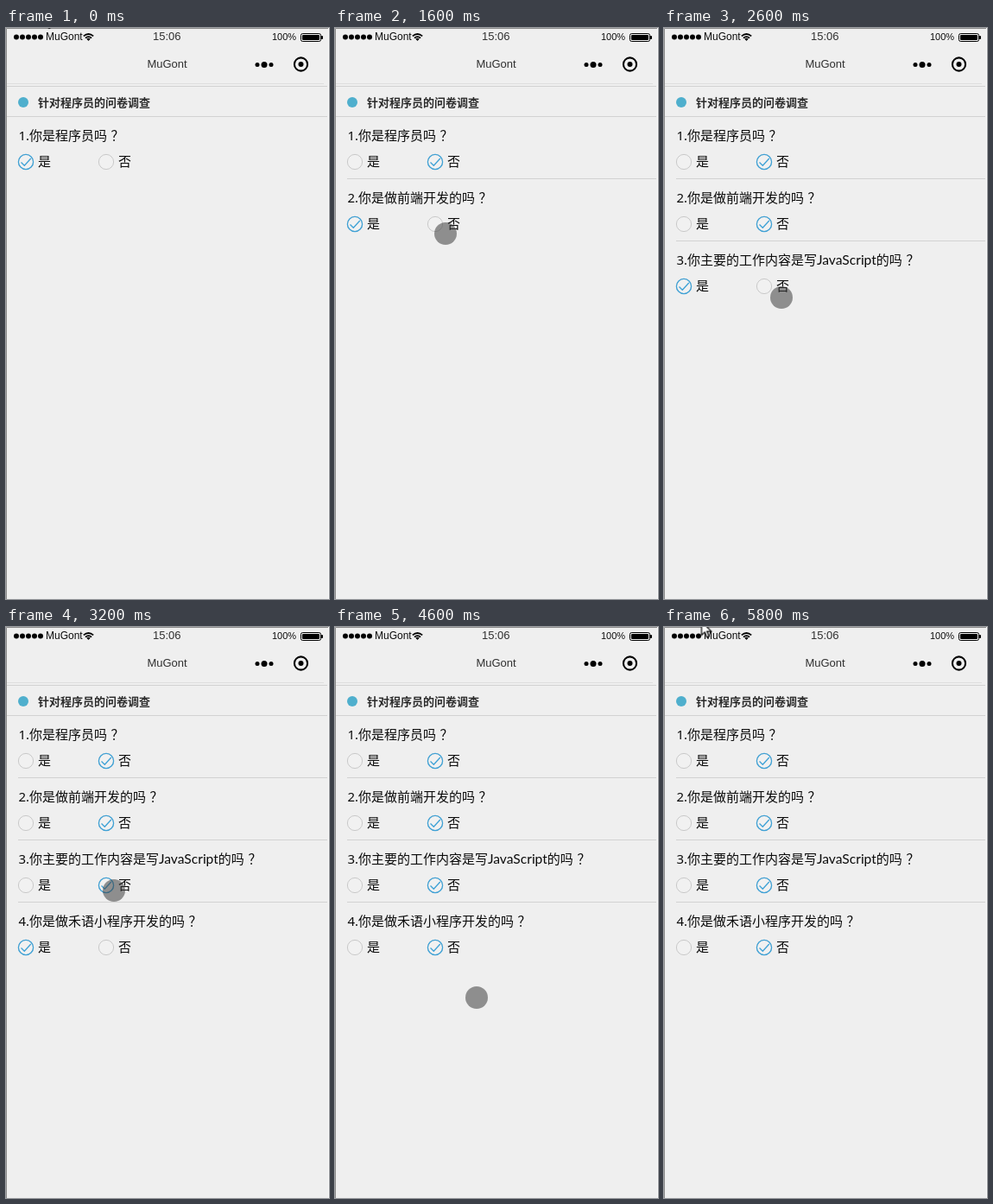
Recreate the animation shown at these times as an HTML page. Size 374 by 661 pixels, loop 6 s.

```html
<!DOCTYPE html>
<html lang="zh-CN">
<head>
<meta charset="utf-8">
<title>问卷调查</title>
<style>
  @property --n { syntax: "<number>"; inherits: true; initial-value: 0; }

  html, body { margin: 0; width: 100%; height: 100%; overflow: hidden; background: #efefef; }

  svg {
    display: block; width: 374px; height: 661px;
    animation: answers 6s step-end infinite;
  }

  text { fill: #0c0c0c; white-space: pre; }
  .ui { font-family: "Liberation Sans", Arial, sans-serif; }
  .soft { fill: #303030; font-size: 13px; }
  .cn { font: 15px "Noto Sans", "Noto Sans CJK SC", sans-serif; }
  .latin { font-family: Lato, sans-serif; font-size: 15.6px; }
  .head { font-size: 13px; font-weight: 700; fill: #2b2b2b; }
  .rule { stroke: #d2d2d2; }
  .ring { fill: #f1f1f1; stroke: #c9c9c9; }
  .tick { fill: none; stroke: #3da1d6; stroke-width: 1.3; }

  /* --n counts the answered questions, --i is the row */
  .row { opacity: clamp(0, var(--n) - var(--i) + 1, 1); }
  .tick { transform: translateX(calc(93px * clamp(0, var(--n) - var(--i), 1))); }

  .touch { fill: rgba(56, 56, 56, .53); animation: touch 6s step-end infinite; }
  .arrow { fill: #fff; stroke: #000; stroke-width: 1.2; animation: arrow 6s step-end infinite; }

  @keyframes answers {
    0% { --n: 0; }
    23.333% { --n: 1; }
    33.333% { --n: 2; }
    53.333% { --n: 3; }
    70%, to { --n: 4; }
  }

  @keyframes touch {
    0% { transform: translate(-50px, 0); }
    6.666% { transform: translate(53px, 90px); }
    10% { transform: translate(98px, 160px); }
    13.333% { transform: translate(115px, 180px); }
    16.666% { transform: translate(132px, 188px); }
    20% { transform: translate(122px, 163px); }
    23.333% { transform: translate(122px, 172px); }
    26.666% { transform: translate(128px, 238px); }
    30% { transform: translate(125px, 234px); }
    33.333% { transform: translate(124px, 235px); }
    36.666% { transform: translate(126px, 242px); }
    43.333% { transform: translate(136px, 312px); }
    46.666% { transform: translate(130px, 307px); }
    50% { transform: translate(126px, 304px); }
    53.333% { transform: translate(125px, 305px); }
    56.666% { transform: translate(126px, 345px); }
    60% { transform: translate(130px, 405px); }
    63.333% { transform: translate(143px, 391px); }
    76.666% { transform: translate(164px, 429px); }
    83.333% { transform: translate(122px, 208px); }
    86.666% { transform: translate(66px, 126px); }
    90% { transform: translate(27px, 78px); }
    93.333%, to { transform: translate(-50px, 0); }
  }

  @keyframes arrow {
    0% { transform: translate(43.5px, -18px); }
    3.333% { transform: translate(44.5px, 24.5px); }
    6.666% { transform: translate(-50px, 0); }
    93.333% { transform: translate(36.5px, 30.5px); }
    96.666%, to { transform: translate(43.5px, -6.5px); }
  }
</style>
</head>
<body>
<svg viewBox="0 0 374 661">
  <rect width="374" height="661" fill="#efefef"/>
  <path d="M373.5 0V661" stroke="#fafafa"/>
  <path d="M.5 661V.5H373" fill="none" stroke="#8c8c8c"/>

  <g class="ui">
    <path d="M12 10.5h28.1" stroke="#000" stroke-width="6" stroke-linecap="round" stroke-dasharray="0 7"/>
    <text x="46" y="14" font-size="12">MuGont</text>
    <g fill="none" stroke="#000" stroke-width="1.7">
      <path d="M89.8 9.4Q95.5 4.6 101.2 9.4M91.9 11.6Q95.5 8.6 99.1 11.6"/>
      <path d="M93.2 12.5Q95.5 10.9 97.8 12.5L95.5 15Z" fill="#000" stroke="none"/>
    </g>
    <text class="soft" x="170" y="14">15:06</text>
    <text x="308" y="14" font-size="11">100%</text>
    <rect x="341.5" y="6.5" width="23" height="9" rx="2" fill="none" stroke="#000"/>
    <rect x="343" y="8" width="20" height="6" rx="1"/>
    <rect x="365" y="9" width="2" height="4" rx=".8"/>
    <text class="soft" x="186.5" y="46" text-anchor="middle">MuGont</text>
    <circle cx="291" cy="42.5" r="2.5"/>
    <circle cx="299" cy="42.5" r="3.5"/>
    <circle cx="307" cy="42.5" r="2.5"/>
    <circle cx="341.5" cy="42" r="7.6" fill="none" stroke="#000" stroke-width="2.1"/>
    <circle cx="341.5" cy="42" r="3"/>
  </g>

  <path d="M1 64.5H368" stroke="#dedede"/>
  <path class="rule" d="M1 67.5H372M1 102.5H372"/>
  <circle cx="20" cy="86" r="6" fill="#4fafcd"/>
  <text class="cn head" style="font-size:13px;font-weight:700" x="37" y="91">针对程序员的问卷调查</text>

  <g id="rows"></g>
  <circle class="touch" r="13"/>
  <path class="arrow" d="M0 0V16L3.7 12.6L6.3 18.4L8.8 17.3L6.3 11.6H11.3Z"/>
</svg>
<script>
  const questions = [
    "你是程序员吗",
    "你是做前端开发的吗",
    "你主要的工作内容是写JavaScript的吗",
    "你是做禾语小程序开发的吗"
  ];

  const option = (x, label) =>
    `<circle class="ring" cx="${x}" cy="155" r="8.6"/>
     <text class="cn" x="${x + 14}" y="160">${label}</text>`;

  const row = (text, i) => {
    const body = text.replace(/[A-Za-z]+/, '<tspan class="latin">$&</tspan>');
    const rule = i ? '<path class="rule" d="M14 102.5H372"/>' : "";
    return `<g class="row" style="--i:${i}" transform="translate(0 ${72 * i})">
      ${rule}
      <text class="cn" x="14.4" y="130">${i + 1}.${body}<tspan dx="4.5">？</tspan></text>
      ${option(23, "是")}${option(116, "否")}
      <g class="tick"><circle cx="23" cy="155" r="8.6"/><path d="M17.5 155.5L21.3 159.3L28.8 151"/></g>
    </g>`;
  };

  document.getElementById("rows").innerHTML = questions.map(row).join("");
</script>
</body>
</html>
```
